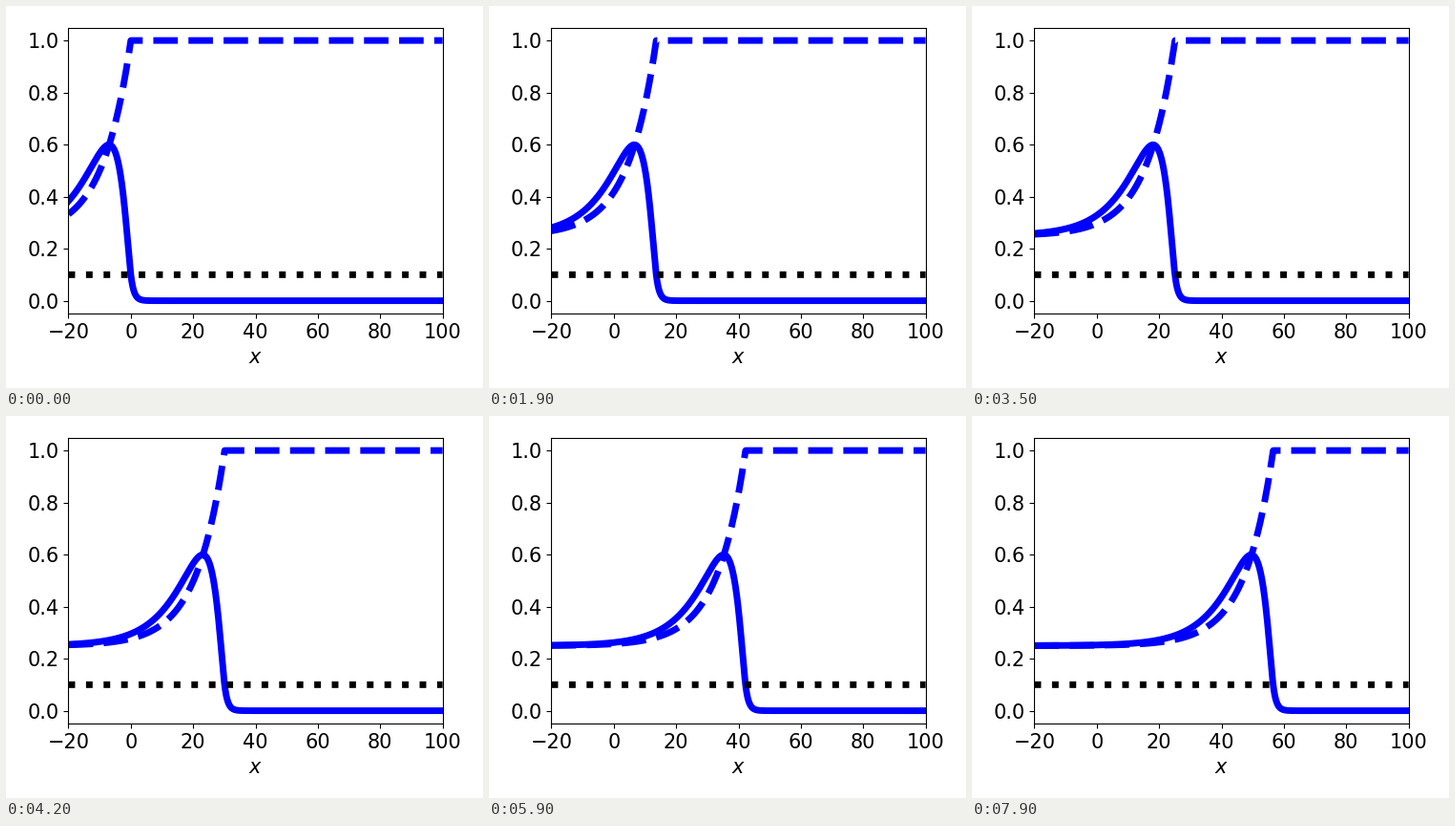
Write a matplotlib script that moves like this. It is 500 by 400 pixels and loops after 8 s.

```python
import numpy as np
import matplotlib.pyplot as plt
from matplotlib.animation import FuncAnimation

plt.rcParams["font.size"] = 15

FRAMES, INTERVAL = 80, 100
STEP = 0.716                 # front displacement per frame

# Travelling pulse of a neural field with synaptic depression
THETA = 0.1                  # firing threshold
ALPHA, BETA = 10.0, 0.3      # depression time scale and strength
Q0 = 1 / (1 + ALPHA * BETA)  # depressed resource level
TAU = ALPHA * Q0

# Wave speed: positive root of the threshold condition
gain = 1 / (2 * THETA)
speed = max(np.roots([TAU, TAU + 1 - gain * TAU, 1 - gain * Q0]))
k = 1 / (speed * TAU)

A1 = (Q0 + (1 - Q0) / (1 - k)) / (2 * (speed - 1))
A2 = (1 - Q0) / ((1 - k**2) * (1 - speed * k))
A3 = THETA - Q0 - A1 - A2


def resource(xi):
    return Q0 + (1 - Q0) * np.exp(k * np.minimum(xi, 0))


def activity(xi):
    back = np.minimum(xi, 0)
    wake = Q0 + A1 * np.exp(back) + A2 * np.exp(k * back) + A3 * np.exp(back / speed)
    return np.where(xi > 0, THETA * np.exp(-np.maximum(xi, 0)), wake)


x = np.linspace(-20, 100, 1201)

fig, ax = plt.subplots(figsize=(5, 4), dpi=100)
u_line, = ax.plot(x, activity(x), "b-", lw=5)
q_line, = ax.plot(x, resource(x), "b--", lw=5)
ax.plot(x, np.full_like(x, THETA), "k:", lw=5)
ax.set_xlim(-20, 100)
ax.set_ylim(-0.05, 1.05)
ax.set_xlabel("$x$")
fig.tight_layout()


def update(i):
    xi = x - STEP * i
    u_line.set_ydata(activity(xi))
    q_line.set_ydata(resource(xi))
    return u_line, q_line


anim = FuncAnimation(fig, update, frames=FRAMES, interval=INTERVAL,
                     repeat=True, repeat_delay=0)
plt.show()
```
